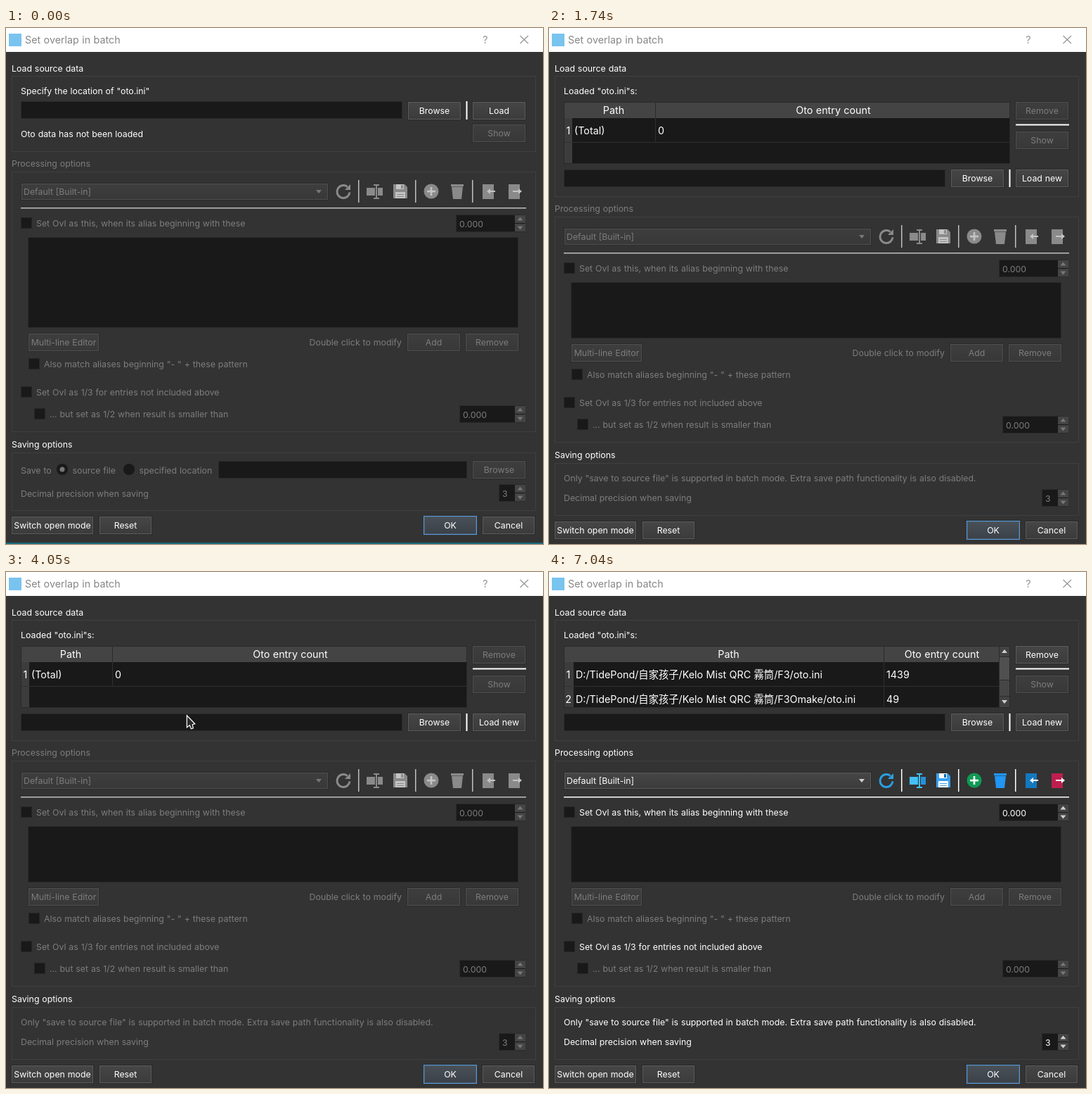
Write an HTML page with a canvas that moves like this. It is 764 by 733 pixels and loops after 7290 ms.

```html
<!DOCTYPE html>
<html lang="en">
<head>
<meta charset="utf-8">
<title>Set overlap in batch</title>
<style>
html, body { margin: 0; width: 100%; height: 100%; overflow: hidden; background: #333; }
canvas { display: block; }
</style>
</head>
<body>
<canvas id="stage" width="764" height="733"></canvas>
<script>
const ctx = document.getElementById('stage').getContext('2d');
const LOOP = 7290, BODY = 12.35, BIG = 14.3;
const WHITE = '#fff', DIM = '#7d7d7d', BG = '#333', BASE = '#191919', BLUE = '#5598dc';
const FONT = 'Inter, "Noto Sans CJK SC", "Noto Sans CJK JP", sans-serif';
const FOLDER = 'D:/TidePond/自家孩子/Kelo Mist QRC 霧筒/';

// Pointer tracks: [time, x, y]
const tracks = [
  [[120, 190, 738], [300, 150, 722], [500, 112, 708], [700, 98, 703], [940, 98, 703], [1030, 92, 745]],
  [[3810, 257, 205], [4050, 255, 204], [4250, 420, 160], [4450, 640, 130], [4600, 745, 190],
   [4680, 722, 227], [4750, 706, 209], [5290, 706, 209], [5440, 728, 330], [5660, 702, 607],
   [5850, 330, 640], [6010, 12, 667], [6050, 20, 672], [6170, 108, 738]]
];
const dragTrack = [[3240, 596, 401], [3360, 470, 250], [3480, 268, 112], [3540, 262, 118],
  [3600, 265, 179], [3700, 252, 204], [3810, 256, 205]];

function along(track, t) {
  const i = track.findIndex(k => k[0] > t);
  if (i < 1) return null;
  const [t0, x0, y0] = track[i - 1], [t1, x1, y1] = track[i];
  const u = (t - t0) / (t1 - t0);
  return [x0 + (x1 - x0) * u, y0 + (y1 - y0) * u];
}

function rect(x, y, w, h, color) {
  ctx.fillStyle = color;
  ctx.fillRect(x, y, w, h);
}
function frame(x, y, w, h, color) {
  ctx.strokeStyle = color;
  ctx.lineWidth = 1;
  ctx.strokeRect(x + .5, y + .5, w - 1, h - 1);
}
function poly(points, color) {
  ctx.beginPath();
  points.forEach(p => ctx.lineTo(...p));
  ctx.closePath();
  ctx.fillStyle = color;
  ctx.fill();
}
function disc(x, y, r, color) {
  ctx.beginPath();
  ctx.arc(x, y, r, 0, 7);
  ctx.fillStyle = color;
  ctx.fill();
}
function line(points, color, width) {
  ctx.beginPath();
  points.forEach(p => ctx.lineTo(...p));
  ctx.strokeStyle = color;
  ctx.lineWidth = width;
  ctx.stroke();
}
// y is the middle of the capitals
function text(s, x, y, color = WHITE, size = BODY, align = 'left', weight = 400) {
  ctx.font = `${weight} ${size}px ${FONT}`;
  ctx.wordSpacing = '0.4px';
  ctx.textAlign = align;
  ctx.fillStyle = color;
  ctx.fillText(s, x, Math.round(y + size * .36 + .3));
}
const ink = on => on ? WHITE : DIM;

function group(y, bottom) { frame(8, y, 746, bottom - y, '#404040'); }
function field(x, y, w, h = 25) { rect(x, y, w, h, BASE); frame(x, y, w, h, '#2a2a2a'); }

// Raised surface shared by buttons and the drop-down
function plate(x, y, w, h, on, focus) {
  const fill = ctx.createLinearGradient(0, y, 0, y + h);
  fill.addColorStop(0, focus ? '#4a5057' : on ? '#464646' : '#3e3e3e');
  fill.addColorStop(1, focus ? '#3b4148' : on ? '#3b3b3b' : '#383838');
  rect(x, y, w, h, fill);
  frame(x, y, w, h, focus ? '#4c5a68' : on ? '#5c5c5c' : '#505050');
  frame(x - 1, y - 1, w + 2, h + 2, focus ? BLUE : '#2b2b2b');
}
function button(label, x, y, w, on = true, focus = false) {
  plate(x, y, w, 25, on, focus);
  text(label, x + w / 2, y + 12.5, ink(on), BODY, 'center');
}
function arrow(x, y, dir, color) {
  poly([[x - 4, y - 2 * dir], [x + 4, y - 2 * dir], [x, y + 3 * dir]], color);
}
function spin(value, x, y, on) {
  field(x, y, 739 - x, 25);
  for (const [dy, dir] of [[1, -1], [13, 1]]) {
    rect(724, y + dy, 15, 11, '#444');
    arrow(731.5, y + dy + 5.5, dir, on ? '#d0d0d0' : '#777');
  }
  text(value, x + 5, y + 13, ink(on));
}
function check(label, x, y, on, gap = 22) {
  rect(x, y - 8, 16, 16, BASE);
  frame(x, y - 8, 16, 16, '#262626');
  text(label, x + gap, y, ink(on));
}
function radio(label, x, y, chosen) {
  disc(x, y - 1, 8, BASE);
  if (chosen) disc(x, y - 1, 3.5, '#777');
  text(label, x + 14.5, y, DIM);
}

function titleBar(active) {
  const color = active ? '#000' : '#929292';
  rect(0, 0, 764, 34, WHITE);
  rect(4, 8, 18, 18, '#78c4ee');
  text('Set overlap in batch', 27, 17, active ? '#111' : '#868686', BIG);
  text('?', 682, 16.5, color, BIG, 'center');
  line([[731.5, 11], [743, 22]], color, 1.1);
  line([[743, 11], [731.5, 22]], color, 1.1);
}

function toolbar(y, on) {
  const c = color => on ? color : '#8a8a8a', light = on ? WHITE : '#c4c4c4';
  const rule = on ? WHITE : '#c0c0c0';
  ctx.beginPath();
  ctx.arc(480, y + .5, 9, .1, 5.4);
  ctx.strokeStyle = c('#2b9fe3');
  ctx.lineWidth = 3;
  ctx.stroke();
  poly([[490, y - 10], [490, y - 2], [482, y - 2]], c('#2b9fe3'));

  rect(513, y - 5, 12, 11, c('#43c0f5'));
  rect(529, y - 5, 7, 11, c('#2492d8'));
  rect(526, y - 9, 2, 19, c('#43c0f5'));
  rect(523, y - 10, 8, 2, c('#43c0f5'));
  rect(523, y + 9, 8, 2, c('#43c0f5'));

  poly([[551, y - 10], [567, y - 10], [571, y - 6], [571, y + 10], [551, y + 10]], c('#3ba0f2'));
  rect(555, y - 10, 11, 7, light);
  rect(562, y - 9, 3, 5, c('#1766a8'));
  rect(554, y + 1, 14, 9, light);
  rect(556, y + 4, 10, 1, c('#3ba0f2'));
  rect(556, y + 7, 10, 1, c('#3ba0f2'));

  disc(605, y, 10.5, c('#109a55'));
  rect(599, y - 1.2, 12, 2.6, light);
  rect(603.7, y - 6, 2.6, 12, light);

  rect(633, y - 10, 18, 3, c('#2196f3'));
  poly([[634, y - 6.5], [650, y - 6.5], [648, y + 11], [636, y + 11]], c('#2196f3'));

  rect(678, y - 10, 16, 21, c('#1478be'));
  rect(688, y - 1, 8, 2, light);
  poly([[684, y], [689, y - 4], [689, y + 4]], light);
  rect(715, y - 10, 16, 21, c('#bd1f4e'));
  rect(721, y - 1, 8, 2, light);
  poly([[734, y], [729, y - 4], [729, y + 4]], light);

  for (const x of [501, 582, 663]) rect(x, y - 16, 1.5, 32, rule);
  rect(21, y + 23, 719, 1.5, rule);
}

function singleSource() {
  group(68, 176);
  text('Specify the location of "oto.ini"', 21, 89);
  field(21, 104, 543);
  button('Browse', 572, 105, 75);
  rect(654.5, 104, 2, 26, WHITE);
  button('Load', 664, 105, 75);
  text('Oto data has not been loaded', 21, 150);
  button('Show', 664, 137, 75, false);
}

function batchSource(loaded, focus, paths) {
  const left = loaded ? 35 : 33, split = loaded ? 476 : 151, right = loaded ? 640 : 656;
  const rows = loaded
    ? [[FOLDER + 'F3/oto.ini', '1439'], [FOLDER + 'F3Omake/oto.ini', '49']]
    : [['(Total)', '0']];
  group(68, 240);
  text('Loaded "oto.ini"s:', 21, 89);
  rect(21, 105, 635, 88, BASE);
  rect(21, 105, right - 21, 23, '#444');
  rect(21, 128, left - 21, 65, '#3c3c3c');
  rect(split, 105, 1, 23, '#2a2a2a');
  rect(split, 128, 1, loaded ? 65 : 35, '#303030');
  rect(21, 162, right - 21, 1, '#303030');
  text('Path', (left + split) / 2, 117, WHITE, BIG, 'center');
  text('Oto entry count', (split + right) / 2 + 1, 117, WHITE, BIG, 'center');
  rows.forEach(([path, count], i) => {
    const y = 146 + 35 * i;
    text(i + 1, 27.5, y, WHITE, BIG, 'center');
    text(path, left + 3, y, WHITE, BIG);
    text(count, split + 4, y, WHITE, BIG);
  });
  if (loaded) {
    rect(640, 105, 16, 88, '#2c2c2c');
    rect(641, 105, 15, 15, '#424242');
    rect(641, 121, 15, 32, '#505050');
    rect(641, 154, 15, 22, '#464646');
    rect(641, 177, 15, 16, '#424242');
    arrow(648, 113, -1, '#d0d0d0');
    arrow(648, 184, 1, '#d0d0d0');
  }
  frame(21, 105, 635, 88, '#2a2a2a');
  button('Remove', 664, 105, 75, loaded);
  rect(664, 136.5, 76, 2, WHITE);
  button('Show', 664, 147, 75, false);
  field(21, 201, 543);
  if (paths) {
    ctx.save();
    ctx.beginPath();
    ctx.rect(23, 202, 539, 23);
    ctx.clip();
    text(`${FOLDER}F3/oto.ini|${FOLDER}F3Omake/oto.ini`, 560, 213, WHITE, BODY, 'right');
    ctx.restore();
  }
  button('Browse', 572, 201, 75);
  rect(654.5, 201, 2, 25, WHITE);
  button('Load new', 664, 201, 75, true, focus === 'load');
}

function processing(batch, on) {
  const top = batch ? 64 : 0, low = batch ? 15 : 0;
  text('Processing options', 8, 192 + top, ink(on));
  group(204 + top, 574 + low);
  plate(22, 221 + top, 436, 23, on, false);
  text('Default [Built-in]', 25, 232 + top, ink(on));
  arrow(445, 232 + top, 1, on ? '#d0d0d0' : '#777');
  toolbar(232 + top, on);
  check('Set Ovl as this, when its alias beginning with these', 21, 277 + top, on);
  spin('0.000', 640, 265 + top, on);
  field(31, 297 + top, 698, 129 + low - top);
  button('Multi-line Editor', 32, 434 + low, 100, false);
  text('Double click to modify', 563, 446 + low, DIM, BODY, 'right');
  button('Add', 571, 434 + low, 75, false);
  button('Remove', 654, 434 + low, 75, false);
  check('Also match aliases beginning "- " + these pattern', 32, 477 + low, false);
  check('Set Ovl as 1/3 for entries not included above', 21, 517 + low, on);
  check('... but set as 1/2 when result is smaller than', 40, 548 + low, false);
  spin('0.000', 645, 536 + low, false);
}

function saving(batch, on) {
  text('Saving options', 8, batch ? 606 : 591);
  if (batch) {
    group(618, 693);
    text('Only "save to source file" is supported in batch mode. Extra save path functionality is also disabled.', 21, 639, ink(on));
  } else {
    group(603, 686);
    text('Save to', 21, 628, DIM);
    radio('source file', 80, 628, true);
    radio('specified location', 175, 628, false);
    field(302, 615, 354);
    button('Browse', 664, 615, 75, false);
  }
  text('Decimal precision when saving', 21, batch ? 667 : 661, ink(on));
  spin('3', 701, batch ? 655 : 648, on);
}

function pointer(x, y, pressed) {
  if (pressed) disc(x, y - 1, 14, 'rgba(255,255,0,.5)');
  ctx.save();
  ctx.translate(x + 1, y);
  poly([[.5, 0], [.5, 17], [4.5, 14], [6.5, 19], [9.5, 18], [8.5, 13], [12, 12]], pressed ? WHITE : '#2c2c2c');
  ctx.strokeStyle = WHITE;
  ctx.lineWidth = 1.2;
  ctx.stroke();
  ctx.restore();
}

function dragged(x, y) {
  rect(x - 47, y - 84, 58, 120, '#1264a8');
  for (let i = 0; i < 5; i++) {
    const row = y - 72 + 24 * i;
    rect(x - 63, row - 8, 13, 16, '#3d7fae');
    disc(x - 56.5, row + 1, 4, '#b8d8ea');
    disc(x - 56.5, row + 1, 1.6, '#3d7fae');
    text('oto.ini', x - 45, row, '#c3d6e3', 15.6, 'left', 700);
  }
  ctx.setLineDash([1, 1]);
  frame(x - 47, y - 12, 58, 24, '#c08a50');
  ctx.setLineDash([]);
  disc(x, y, 13.5, 'rgba(220,200,40,.9)');
  disc(x, y, 10, '#8a7420');
  disc(x, y, 9, '#ffd84c');
  line([[x - 6, y + 4], [x + 6, y - 4]], '#8a7420', 4);
  line([[x - 6, y + 4], [x + 6, y - 4]], '#fff3b8', 2);
}

function dragStart(x, y) {
  pointer(x, y + 1, true);
  ctx.setLineDash([2, 1]);
  frame(x + 5, y + 16, 11, 10, '#ddd');
  ctx.setLineDash([]);
  rect(x + 12, y + 22, 6, 6, WHITE);
  rect(x + 14, y + 24, 2, 2, '#222');
}

function draw(t) {
  const during = (a, b) => t >= a && t < b;
  const batch = t >= 860, loaded = t >= 5000;
  const active = during(740, 1690) || during(4840, 7000);
  const focus = !active ? 'ok' : t < 1690 ? 'switch' : 'load';
  const row = batch ? 701 : 694;

  rect(0, 0, 764, 733, BG);
  titleBar(active);
  text('Load source data', 8, 57);
  if (batch) batchSource(loaded, focus, during(4100, 5000));
  else singleSource();
  processing(batch, loaded);
  saving(batch, loaded);
  button('Switch open mode', 8, row, 116, true, focus === 'switch');
  button('Reset', 133, row, 74);
  button('OK', 595, row, 74, true, focus === 'ok');
  button('Cancel', 678, row, 74);
  if (!batch) rect(0, 731, 764, 2, '#176b79');

  const drag = along(dragTrack, t);
  if (drag) (t < 3280 ? dragStart : dragged)(...drag);
  for (const track of tracks) {
    const p = along(track, t);
    if (p) pointer(...p, during(740, 860) || during(4840, 4960));
  }
}

const start = performance.now();
(function tick() {
  draw((performance.now() - start) % LOOP);
  requestAnimationFrame(tick);
})();
</script>
</body>
</html>
```
